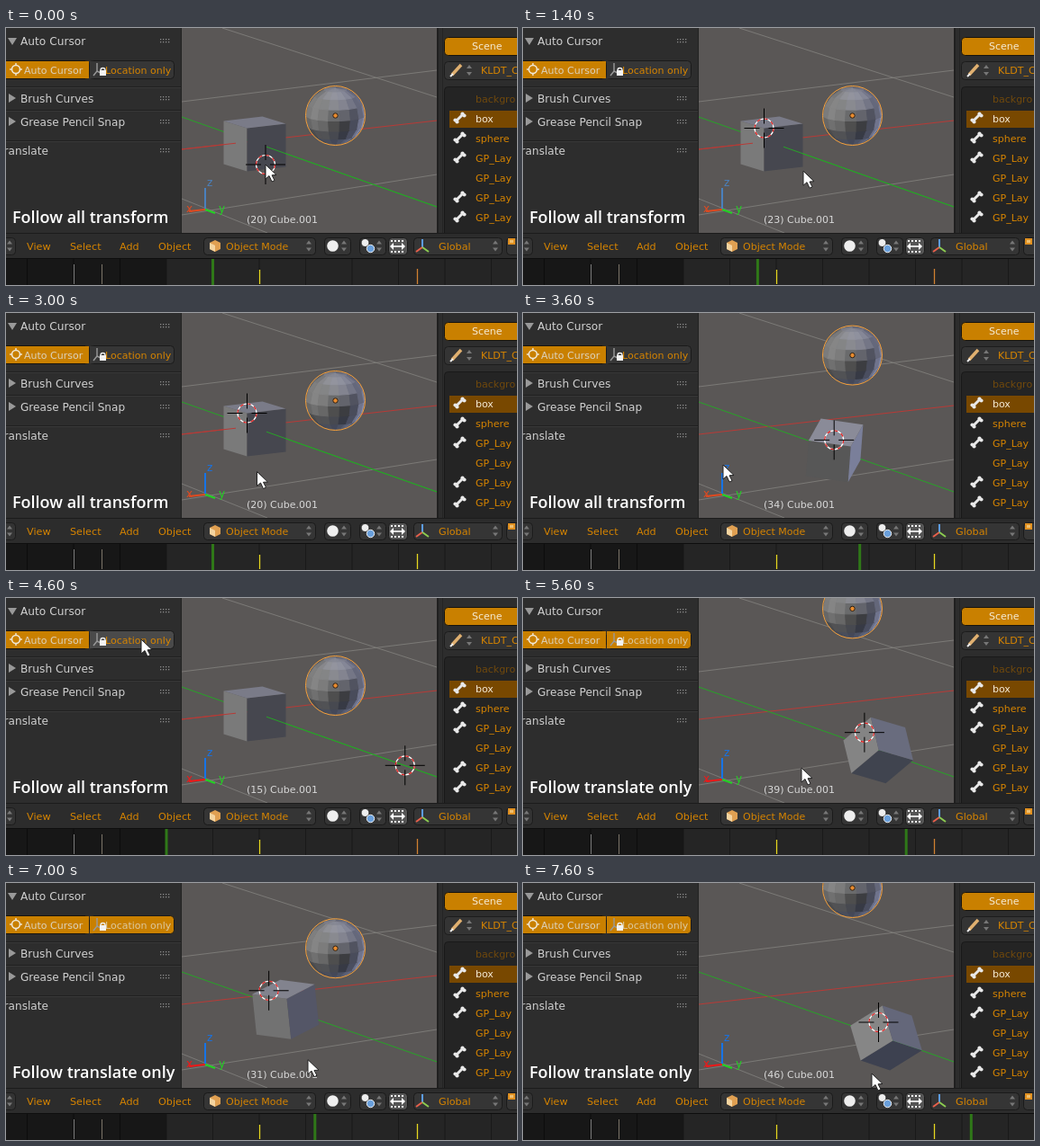
These frames come from a looping animation (567 px wide and 286 px high, 7.8 s). An HTML page with a canvas:

```html
<!DOCTYPE html>
<html lang="en">
<head>
<meta charset="utf-8">
<title>Cursor follow demo</title>
<style>
html, body { margin: 0; width: 567px; height: 286px; overflow: hidden; background: #2c2c2c; }
canvas { display: block; }
</style>
</head>
<body>
<canvas id="stage" width="567" height="286"></canvas>
<script>
const c = document.getElementById('stage').getContext('2d');
const LOOP = 7800, TICK = 200;
const ORANGE = '#d68400', FILL = '#c98000', LIGHT = '#d0d0d0';
const UI = '"DejaVu Sans", sans-serif';

// ---- drawing helpers ----
function rect(x, y, w, h, color) { c.fillStyle = color; c.fillRect(x, y, w, h); }
function box(x, y, w, h, color, border) {
  c.beginPath(); c.roundRect(x + .5, y + .5, w, h, 4);
  c.fillStyle = color; c.fill();
  if (border) { c.strokeStyle = border; c.lineWidth = 1; c.stroke(); }
}
function text(s, x, y, color = ORANGE, size = 11, font = UI, weight = 400) {
  c.font = `${weight} ${size}px ${font}`; c.fillStyle = color; c.fillText(s, x, y);
}
function line(color, width, ...p) {
  c.beginPath(); c.strokeStyle = color; c.lineWidth = width;
  for (let i = 0; i < p.length; i += 2) c.lineTo(p[i], p[i + 1]);
  c.stroke();
}
function poly(points, color, border) {
  c.beginPath(); points.forEach(p => c.lineTo(p[0], p[1])); c.closePath();
  c.fillStyle = color; c.fill();
  if (border) { c.strokeStyle = border; c.lineWidth = 1; c.stroke(); }
}
function circle(x, y, r, color, border, width = 1) {
  c.beginPath(); c.arc(x, y, r, 0, 7);
  if (color) { c.fillStyle = color; c.fill(); }
  if (border) { c.strokeStyle = border; c.lineWidth = width; c.stroke(); }
}
function arrows(x, y, color = '#777') {
  poly([[x - 3, y - 2], [x, y - 6], [x + 3, y - 2]], color);
  poly([[x - 3, y + 2], [x, y + 6], [x + 3, y + 2]], color);
}

// ---- 3D: x right, y up, z toward the viewer ----
const add = (a, b, k = 1) => a.map((v, i) => v + b[i] * k);
const dot = (a, b) => a[0] * b[0] + a[1] * b[1] + a[2] * b[2];
const cross = (a, b) => [a[1] * b[2] - a[2] * b[1], a[2] * b[0] - a[0] * b[2], a[0] * b[1] - a[1] * b[0]];
const unit = a => a.map(v => v / Math.hypot(...a));
const AXES = [[-21.5, -2.5, 12.5], [13, -4, 21], [0, 24, 7]];
const LAMPS = [
  [unit([-.892, .3, .9]), [.51, .51, .51]],
  [unit([.75, .58, .1]), [.41, .42, .5]],
  [unit([.216, -.392, -.216]), [.42, .45, .56]]
];
function shade(n) {
  const rgb = [0, 1, 2].map(i => Math.round(255 *
    LAMPS.reduce((sum, [dir, col]) => sum + Math.max(0, dot(n, dir)) * col[i], .015)));
  return `rgb(${rgb})`;
}
function spin(v, r) {
  const deg = Math.hypot(...r);
  if (!deg) return v;
  const n = unit(r), a = deg * Math.PI / 180, cos = Math.cos(a);
  return add(add(v.map(k => k * cos), cross(n, v), Math.sin(a)), n, dot(n, v) * (1 - cos));
}
function ease(u) {
  if (u <= 0) return 0;
  if (u >= 1) return 1;
  let lo = 0, hi = 1, s;
  for (let i = 0; i < 20; i++) {
    s = (lo + hi) / 2;
    const x = 3 * (1 - s) * s * ((1 - s) * .39 + s * .61) + s ** 3;
    if (x < u) lo = s; else hi = s;
  }
  return s * s * (3 - 2 * s);
}
const progress = frame => ease((frame - 25) / 17);
const center = s => [276 + 127 * s, 129 + 43.5 * s];
// The cube turns and gets slightly smaller as it moves away.
const cubeAxes = s => {
  const r = [10.2 * s + 46 * s * s, 58 * s + 28.2 * s * s, 60.8 * s - 58.7 * s * s];
  return AXES.map(v => spin(v, r).map(k => k * (1 - .05 * s)));
};
const cornerOf = axes => axes.reduce((a, b) => add(a, b));

function drawCube(s) {
  const axes = cubeAxes(s), [x, y] = center(s);
  axes.forEach((axis, i) => {
    const n = axis[2] > 0 ? axis : axis.map(v => -v);
    const p = axes[(i + 1) % 3], q = axes[(i + 2) % 3];
    const pts = [[1, 1], [1, -1], [-1, -1], [-1, 1]].map(([a, b]) => {
      const v = add(add(n, p, a), q, b);
      return [x + v[0], y - v[1]];
    });
    poly(pts, shade(unit(n)));
  });
}

const UNITS = AXES.map(unit);
function ballPoint(lat, lon) {
  const k = [Math.cos(lat) * Math.cos(lon), Math.cos(lat) * Math.sin(lon), Math.sin(lat)];
  return k.reduce((v, m, i) => add(v, UNITS[i], m), [0, 0, 0]);
}
function drawBall(x, y) {
  const step = Math.PI / 8;
  for (let i = -4; i < 4; i++) for (let j = 0; j < 16; j++) {
    const n = ballPoint((i + .5) * step, (j + .5) * step);
    if (n[2] < -.12) continue;
    const pts = [[0, 0], [0, 1], [1, 1], [1, 0]].map(([a, b]) => {
      const v = ballPoint((i + a) * step, (j + b) * step);
      return [x + v[0] * 32.5, y - v[1] * 32.5];
    });
    const col = shade(n);
    poly(pts, col, col);
  }
  circle(x, y, 33, null, '#f5a03c', 1);
  circle(x, y, 2.7, '#e88b2e', '#2a2018');
}

// ---- timing ----
const PASSES = [[0, 2200, 42], [2950, 3600, 34], [4500, 4600, 15], [6300, 6400, 17]];
function frameAt(t) {
  const [, t0, f0] = PASSES.filter(p => t >= p[0]).pop();
  return Math.max(t < 2000 ? 20 : 15, Math.round(f0 + (t - t0) * .024));
}
const MOUSE = [[0, 288, 152], [200, 288, 152], [600, 305, 154], [1200, 305, 153], [2200, 335, 184],
  [2600, 335, 184], [3400, 222, 169], [3600, 222, 169], [4400, 150, 46], [4800, 150, 46],
  [5000, 143, 50], [5400, 309, 189], [6800, 309, 189], [7400, 387, 212], [7800, 387, 212]];
function mouseAt(t) {
  const i = MOUSE.findIndex(m => m[0] > t), a = MOUSE[i - 1], b = MOUSE[i];
  const k = (t - a[0]) / (b[0] - a[0]);
  return [a[1] + (b[1] - a[1]) * k, a[2] + (b[2] - a[2]) * k];
}
// The 3D cursor trails the cube by one frame.
function cursorAt(t, frame) {
  if (t < 1000) return [288, 152];
  const s = frame === 15 ? 1 : progress(frame - 1);
  const [x, y] = center(s), v = cornerOf(cubeAxes(t < 4800 ? s : 0));
  return [x + v[0], y - v[1]];
}

// ---- scene ----
function drawView(t, frame) {
  const s = progress(frame), grid = '#85837f';
  c.save();
  c.beginPath(); c.rect(195, 0, 283, 228); c.clip();
  rect(195, 0, 283, 228, '#5a5756');
  line(grid, .8, 195, 82, 478, 47);
  line(grid, .8, 195, 208, 478, 163);
  line(grid, .8, 240, 0, 478, 77);
  line(grid, .8, 195, 190, 290, 228);
  line('#b83a36', 1, 195, 135, 478, 103);
  line('#27a327', 1, 195, 99, 478, 199);
  drawCube(s);
  if (!s) {
    line('#b83a36', 1, 195, 135, 255, 128.2);
    line('#27a327', 1, 289, 132.2, 478, 199);
  }
  drawBall(365.5, 97.5 - 92 * s);

  const red = t < 3700 ? '#e04a20' : '#f01818', blue = t < 2600 ? '#4a80bd' : '#1673e6';
  line(blue, 2, 221, 203, 221, 178);
  line(red, 2, 221, 202, 203, 204);
  line('#22d222', 2, 221, 202, 232, 206);
  text('z', 223, 176, blue, 12);
  text('x', 200, 205, red, 12);
  text('y', 236, 205, '#22d222', 12);
  text(`(${frame}) Cube.001`, 267, 217, frame === 42 ? '#e6dc14' : '#d8d8d8');

  const [x, y] = cursorAt(t, frame);
  circle(x, y, 10.5, null, '#fff', 1.2);
  c.setLineDash([4.1, 4.1]);
  circle(x, y, 10.5, null, '#e01818', 1.2);
  c.setLineDash([]);
  for (const d of [-1, 1]) {
    line('#000', 1, x + 5 * d, y, x + 22 * d, y);
    line('#000', 1, x, y + 5 * d, x, y + 22 * d);
  }
  c.restore();
}

function grip(y) {
  for (let i = 0; i < 8; i++) rect(171 + i % 4 * 3, y - 2 + (i >> 2) * 3, 1.3, 1.3, '#8a8a8a');
}
function drawTools(t) {
  rect(0, 0, 195, 228, '#2d2d2d');
  rect(194, 0, 1, 228, '#222');
  for (const y of [65, 91, 125]) { rect(0, y, 194, 1, '#202020'); rect(0, y + 1, 194, 1, '#383838'); }
  poly([[2, 11], [12, 11], [7, 19]], '#999');
  for (const y of [78, 104]) poly([[3, y - 5], [11, y], [3, y + 5]], '#999');
  text('Auto Cursor', 16, 19, LIGHT, 12.2);
  text('Brush Curves', 16, 83, LIGHT, 12.2);
  text('Grease Pencil Snap', 16, 109, LIGHT, 12.1);
  text('Translate', -8, 141, LIGHT, 12.1);
  [14, 78, 104, 136].forEach(grip);

  const on = t >= 4800, hover = t >= 4300 && !on;
  box(-6, 36, 98, 20, FILL, '#18140c');
  box(92, 36, 94, 20, on ? FILL : hover ? '#4a4a4a' : '#363636', '#1a1a1a');
  rect(88, 37, 4, 19, FILL);
  rect(93, 37, 4, 19, on ? FILL : hover ? '#4a4a4a' : '#363636');
  circle(11, 46, 4.5, null, '#f0e8d8', 1.6);
  line('#f0e8d8', 1.4, 11, 39, 11, 42); line('#f0e8d8', 1.4, 11, 50, 11, 53);
  line('#f0e8d8', 1.4, 4, 46, 7, 46); line('#f0e8d8', 1.4, 15, 46, 18, 46);
  text('Auto Cursor', 20, 51, '#dcd2bf');
  line('#999', 1.4, 101, 39, 101, 48, 97, 53);
  line('#999', 1.4, 101, 48, 105, 50);
  circle(107.5, 47, 2.5, null, '#eee', 1.4);
  rect(104, 47, 7, 6, '#f2f2f2');
  text('Location only', 110, 51, on ? '#dcc8a0' : ORANGE);
  text(t < 4800 ? 'Follow all transform' : 'Follow translate only', 7, 217, '#fff', 18,
    '"Open Sans", "Noto Sans", sans-serif', 600);
}

function bone(x, y) {
  line('#e8e8e8', 3, x - 4, y + 4, x + 3, y - 3);
  for (const [dx, dy] of [[-5, 3], [-3, 5], [3, -4], [5, -2]]) circle(x + dx, y + dy, 2.1, '#e8e8e8');
}
function drawOutline() {
  rect(478, 0, 89, 228, '#2d2d2d');
  rect(478, 0, 2, 228, '#202020');
  rect(484, 0, 1, 228, '#242424');
  box(486, 10, 100, 20, FILL, '#18140c');
  text('Scene', 517, 24, '#f5ecd8');
  box(486, 37, 100, 20, '#343434', '#1c1c1c');
  line('#e0b070', 3.5, 495, 52, 505, 41);
  line('#eee', 2, 493, 54, 496, 51);
  arrows(514, 47);
  text('KLDT_C', 527, 51);
  box(486, 65, 100, 180, '#242424', '#191919');
  rect(492, 92, 75, 19, '#784800');
  const rows = ['backgro', 'box', 'sphere', 'GP_Lay', 'GP_Lay', 'GP_Lay', 'GP_Lay'];
  rows.forEach((name, i) => {
    const y = 78.5 + i * 22;
    text(name, 521, Math.floor(y + 5), i === 0 ? '#71490c' : i === 1 ? '#f4ead6' : ORANGE);
    if (i && i !== 4) bone(503.5, y - 1);
  });
}

function drawHeader() {
  rect(0, 228, 567, 29, '#2c2c2c');
  rect(0, 228, 567, 1, '#1c1c1c');
  box(-6, 233, 16, 19, '#333', '#1c1c1c');
  arrows(4, 242.5);
  [['View', 23], ['Select', 71], ['Add', 126], ['Object', 169]].forEach(([s, x]) => text(s, x, 247, ORANGE, 11.2));
  for (const [x, w] of [[219, 124], [353, 29], [392, 29], [452, 98]]) {
    box(x, 233, w, 19, '#353535', '#1a1a1a');
    arrows(x + w - 7, 242.5);
  }
  box(424, 233, 21, 19, '#555', '#1a1a1a');
  poly([[226, 239], [232, 236], [238, 239], [238, 246], [232, 249], [226, 246]], '#e0a052');
  poly([[226, 239], [232, 242], [232, 249], [226, 246]], '#f4d4a0');
  text('Object Mode', 244, 247);
  circle(362.5, 242.5, 6.3, '#eee');
  circle(398.5, 239, 4.5, '#eee', '#222');
  circle(404.5, 245.5, 4.2, '#6aa0dc', '#eee');
  line('#fff', 1.6, 427, 243, 442, 243);
  poly([[426, 243], [430, 239], [430, 247]], '#fff');
  poly([[443, 243], [439, 239], [439, 247]], '#fff');
  for (let x = 427; x < 443; x += 4) { rect(x, 236, 2, 2, '#fff'); rect(x, 248, 2, 2, '#fff'); }
  line('#5c9ce8', 2, 462, 244, 462, 235);
  line('#e8604c', 2, 462, 244, 455, 249);
  line('#8ccc50', 2, 462, 244, 469, 249);
  text('Global', 480, 247, ORANGE, 11.2);
  box(555, 233, 20, 19, '#353535', '#1a1a1a');
  rect(557, 234, 8, 7, '#e09020'); rect(559, 236, 4, 3, '#f0c070');
}

function drawTimeline(t, frame) {
  const at = f => 229.5 + (f - 20) * 10.3;
  rect(0, 257, 567, 29, '#252525');
  rect(0, 257, 178, 29, '#171717');
  rect(0, 256, 567, 1, '#0e0e0e');
  for (let f = 0; f < 55; f += 5) line(f < 15 ? '#0c0c0c' : '#191919', 1, at(f), 257, at(f), 286);
  line('#7c7c7c', 1, 75.5, 263, 75.5, 285);
  line('#7c7468', 1, 106.5, 263, 106.5, 285);
  line('#e6d820', 1.3, 281.5, 269, 281.5, 285);
  line('#2f7818', 3, at(frame), 257, at(frame), 286);
  const passed = t >= 2200 && t < 4500 || t >= 5800;
  line(passed ? '#e6d820' : '#d08030', 1.3, 456.5, 268, 456.5, 285);
}

function drawMouse(t) {
  const [x, y] = mouseAt(t);
  const shape = [[0, 0], [0, 16], [4, 12.5], [7, 19], [10, 17.6], [7, 11.8], [12, 11.5]];
  poly(shape.map(p => [x + p[0], y + p[1]]), '#fff', '#222');
}

function draw(now) {
  const t = Math.floor(now % LOOP / TICK) * TICK, frame = frameAt(t);
  drawView(t, frame);
  drawTools(t);
  drawOutline();
  drawHeader();
  drawTimeline(t, frame);
  drawMouse(t);
}

const start = performance.now();
(function tick() {
  draw(performance.now() - start);
  requestAnimationFrame(tick);
})();
</script>
</body>
</html>
```
